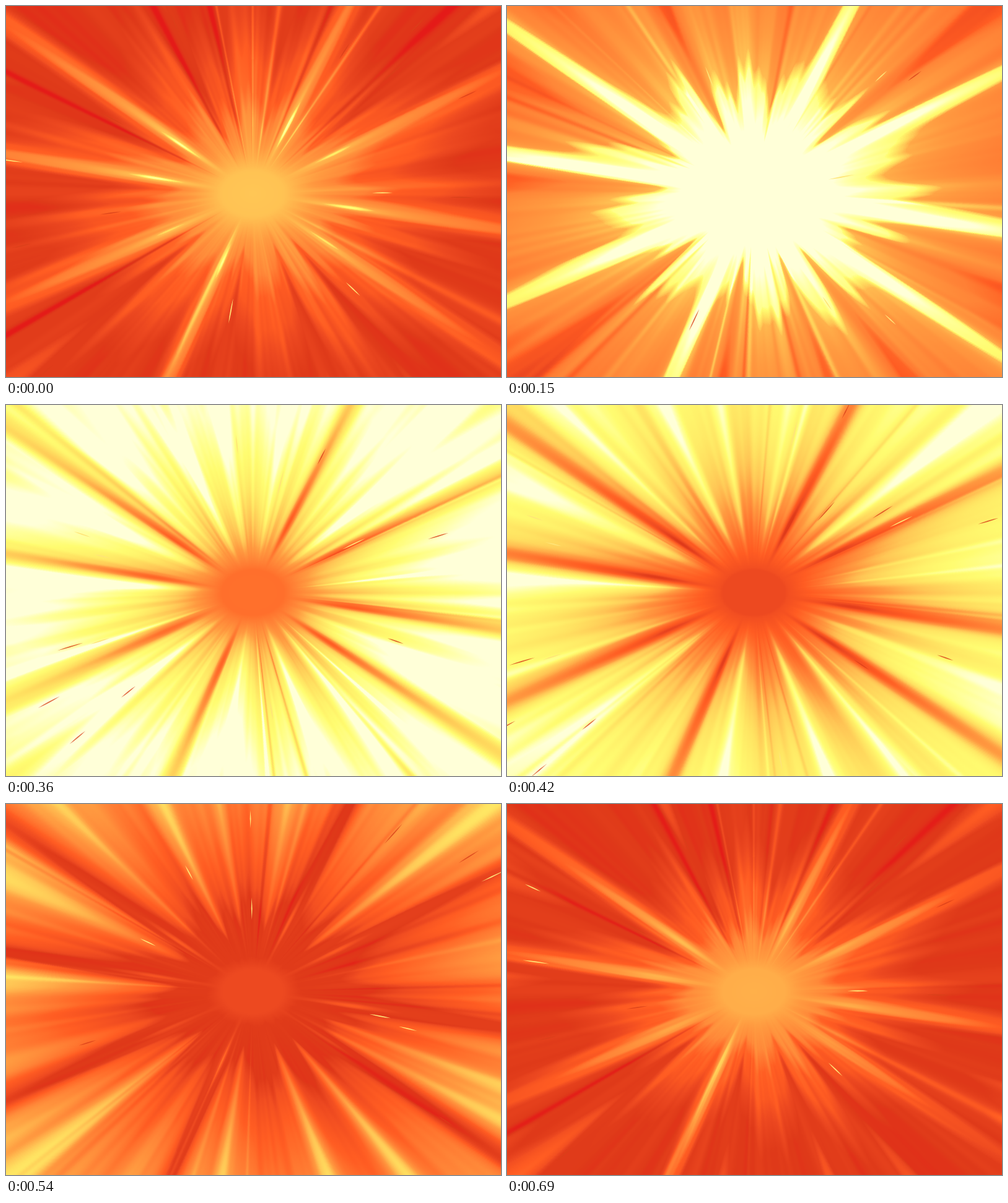
An HTML page with a canvas that plays this animation: 799x600 px, repeating every 720 ms.

```html
<!DOCTYPE html>
<html lang="en">
<head>
<meta charset="utf-8">
<title>Burst</title>
<style>
  html, body { margin: 0; width: 100%; height: 100%; overflow: hidden; background: #e03c1a; }
  canvas { display: block; }
</style>
</head>
<body>
<canvas id="stage" width="799" height="600"></canvas>
<script>
const W = 799, H = 600, CX = 398, CY = 303;
const LOOP = 720, STEP = 30, ANGLES = 4096, TAU = Math.PI * 2;
const ctx = document.getElementById('stage').getContext('2d');
const image = ctx.createImageData(W, H);
const pixels = new Uint32Array(image.data.buffer);

const clamp = (v, lo, hi) => Math.min(hi, Math.max(lo, v));
const mix = (a, b, k) => a + (b - a) * k;
const smooth = k => k * k * (3 - 2 * k);
const table = (size, rule) => Float32Array.from({ length: size }, (_, i) => rule(i));

function random(seed) {
  return () => {
    seed = (seed + 0x6D2B79F5) | 0;
    let n = Math.imul(seed ^ (seed >>> 15), 1 | seed);
    n ^= n + Math.imul(n ^ (n >>> 7), 61 | n);
    return ((n ^ (n >>> 14)) >>> 0) / 4294967296;
  };
}

// Piecewise linear lookup in [[x, y], ...]
function along(points, x) {
  const next = points.findIndex(p => p[0] > x);
  if (next < 0) return points[points.length - 1][1];
  if (next === 0) return points[0][1];
  const [x0, y0] = points[next - 1], [x1, y1] = points[next];
  return mix(y0, y1, (x - x0) / (x1 - x0));
}

// Smooth noise around the circle, -1..1
function ringNoise(cells, seed) {
  const rnd = random(seed);
  const knots = Array.from({ length: cells }, () => rnd() * 2 - 1);
  return table(ANGLES, a => {
    const x = a / ANGLES * cells, i = Math.floor(x);
    return mix(knots[i], knots[(i + 1) % cells], smooth(x - i));
  });
}

function addRay(field, degrees, width, amount) {
  const mid = Math.round(degrees / 360 * ANGLES), w = width / 360 * ANGLES;
  const span = Math.ceil(w * 2.5);
  for (let k = -span; k <= span; k++) {
    field[(mid + k + ANGLES) % ANGLES] += amount * Math.exp(-k * k / (w * w));
  }
}

// Heat at the centre over one loop; it travels outward with a delay
const pulse = [
  [0, .62], [19, .97], [60, 1.05], [100, 1.17], [150, 1.17], [187, 1.02], [240, .85],
  [300, .6], [360, .32], [415, .16], [440, 0], [515, .01], [565, .24],
  [600, .28], [630, .45], [690, .56], [720, .62]
];
const heatAt = table(LOOP, t => along(pulse, t));

const HEAT_MIN = -.3, HEAT_SPAN = 1.3, SHADES = 1024;
const stops = [
  [-.3, 0xe41818], [-.17, 0xe41c18], [0, 0xdf3a19], [.12, 0xec4820], [.24, 0xff5c22],
  [.3, 0xff6c2a], [.4, 0xff8236], [.5, 0xff9a40], [.62, 0xffc655],
  [.72, 0xffe060], [.85, 0xfffc70], [.92, 0xffff98], [1, 0xffffd8]
];
const channel = (heat, shift) => Math.round(along(stops.map(([h, c]) => [h, (c >> shift) & 255]), heat));
const ramp = Uint32Array.from({ length: SHADES }, (_, i) => {
  const h = HEAT_MIN + HEAT_SPAN * i / (SHADES - 1);
  return (255 << 24 | channel(h, 0) << 16 | channel(h, 8) << 8 | channel(h, 16)) >>> 0;
});

// Some directions run ahead of the wave and others trail it, in ms
const broad = ringNoise(50, 5), narrow = ringNoise(160, 6);
const lead = table(ANGLES, a => broad[a] * 26 + narrow[a] * 16);
for (const degrees of [8, 33, 114, 156, 189, 214, 297.5, 334]) addRay(lead, degrees, 2.6, 105);
for (const degrees of [22, 50, 68, 100, 142, 183, 205, 244, 280, 322]) addRay(lead, degrees, 2.8, -65);

// Thin streaks that fade from one set to the next
const SETS = 6;
const streaks = Array.from({ length: SETS }, (_, set) => {
  const rnd = random(set + 31), coarse = ringNoise(110, set + 51), fine = ringNoise(280, set + 71);
  const field = table(ANGLES, a => coarse[a] * .05 + fine[a] * .03);
  for (let i = 0; i < 12; i++) addRay(field, rnd() * 360, .4 + rnd() * .7, i % 2 ? .2 : -.2);
  return field;
});

// Per-pixel polar coordinates, flattened vertically
const angleOf = new Uint16Array(W * H), radiusOf = new Uint16Array(W * H);
for (let y = 0, i = 0; y < H; y++) {
  for (let x = 0; x < W; x++, i++) {
    const dx = x - CX, dy = y - CY;
    angleOf[i] = Math.floor((Math.atan2(dy, dx) / TAU + 1) * ANGLES) % ANGLES;
    radiusOf[i] = Math.hypot(dx, dy * 1.38);
  }
}
const RADII = 640;
const delay = table(RADII, r => 290 * (1 - Math.exp(-Math.max(0, r - 50) / 300)));
const reach = table(RADII, r => smooth(clamp((r - 50) / 130, 0, 1)));
const decay = table(RADII, r => 1 - r * .0003);

function drawBurst(t) {
  const at = t / LOOP * SETS, set = Math.floor(at);
  const next = streaks[(set + 1) % SETS];
  const glow = streaks[set].map((v, a) => mix(v, next[a], at - set));
  const scale = (SHADES - 1) / HEAT_SPAN;
  for (let i = 0; i < pixels.length; i++) {
    const a = angleOf[i], r = radiusOf[i];
    const phase = (t - delay[r] + lead[a] * reach[r] + LOOP) % LOOP | 0;
    const heat = heatAt[phase] * decay[r] + glow[a] * reach[r];
    pixels[i] = ramp[clamp((heat - HEAT_MIN) * scale | 0, 0, SHADES - 1)];
  }
  ctx.putImageData(image, 0, 0);
}

const rnd = random(73);
const sparks = Array.from({ length: 50 }, (_, i) => ({
  angle: rnd() * TAU, birth: rnd() * LOOP, start: 110 + rnd() * 110,
  length: 24 + rnd() * 20, color: i % 2 ? '#ffe478' : '#d9401acc'
}));

function drawSparks(t) {
  for (const s of sparks) {
    const age = (t - s.birth + LOOP) % LOOP / 210;
    if (age > 1) continue;
    const r = s.start + age * 290, half = s.length / 2;
    ctx.save();
    ctx.translate(CX, CY);
    ctx.rotate(s.angle);
    ctx.fillStyle = s.color;
    ctx.beginPath();
    ctx.moveTo(r - half, 0);
    ctx.quadraticCurveTo(r, 1.8, r + half, 0);
    ctx.quadraticCurveTo(r, -1.8, r - half, 0);
    ctx.fill();
    ctx.restore();
  }
}

let shown = -1;
const began = performance.now();
function frame() {
  const t = Math.floor((performance.now() - began) % LOOP / STEP) * STEP;
  if (t !== shown) {
    shown = t;
    drawBurst(t);
    drawSparks(t);
  }
  requestAnimationFrame(frame);
}
frame();
</script>
</body>
</html>
```
